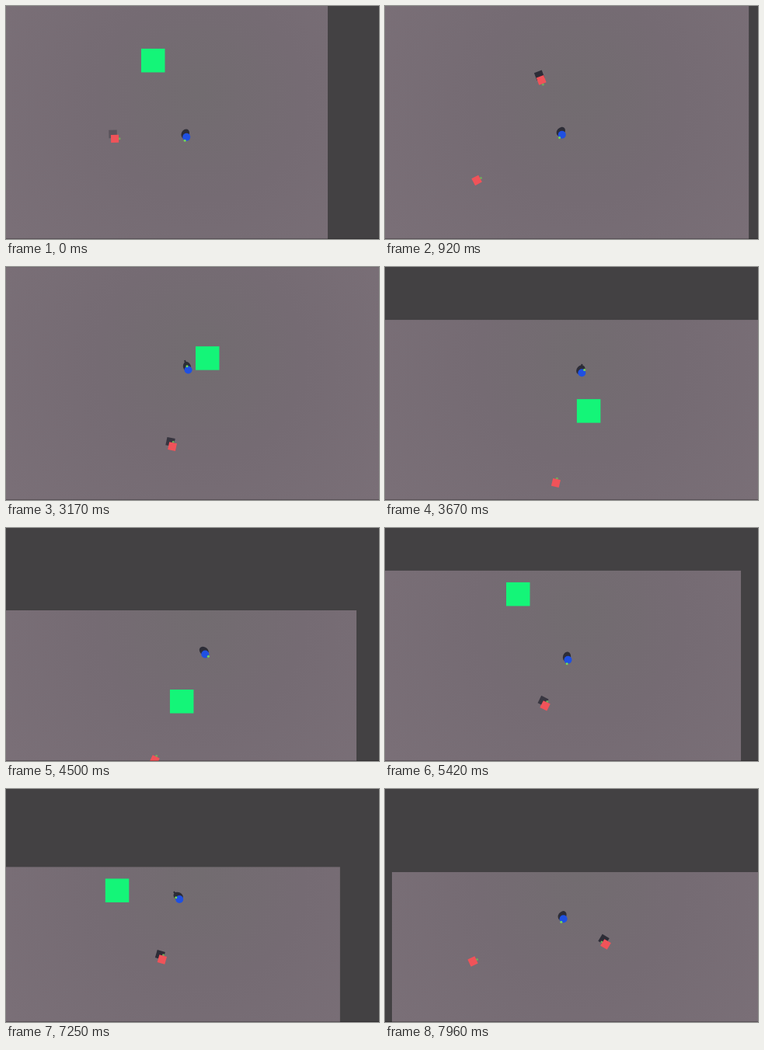
Animation of 480 by 300 pixels, one loop 8000 ms. Source, as an HTML page with a canvas:

```html
<!DOCTYPE html>
<html>
<head>
<meta charset="utf-8">
<style>
  html, body { margin: 0; height: 100%; overflow: hidden; background: #434143; }
  canvas { display: block; }
</style>
</head>
<body>
<canvas id="stage" width="480" height="300"></canvas>
<script>
const ctx = document.getElementById('stage').getContext('2d');
const W = 480, H = 300, LOOP = 8000, ARENA = 500, WALL_GAP = 43;
const DARK = '#2d2d37';

// Poses of the steered view: time, arena x and y, heading in degrees.
// The path leaves and enters each pose along its heading; equal places are a rest.
const poses = [
  [0, 326, 197, 115], [830, 277, 286, 120], [1830, 187, 290, 237],
  [2250, 171, 253, 305], [2900, 254, 181, 300], [3170, 256, 150, 252],
  [3670, 253, 82, 311], [4150, 289, 44, 350], [5030, 289, 44, 465],
  [5420, 282, 95, 465], [5750, 271, 131, 465], [6500, 271, 131, 677],
  [6630, 282, 124, 677], [7350, 302, 45, 550], [7960, 231, 43, 484]
];

// Way points: time, arena x and y
const chasers = [
  [[0, 226, 218], [1830, 240, 257.5], [3170, 230, 231], [3670, 233, 210],
   [5420, 248, 174], [6630, 267.5, 142], [7960, 275, 93]],
  [[0, 145, 380], [7960, 188, 267 ]].map(([t, x, y]) => [t, x, y]),
  [[7760, 98, 119], [7960, 104, 115]]
];

const goals = [
  { from: 0, to: 5300, x: 275.2, y: 117.3 },
  { from: 5300, to: 7760, x: 213.2, y: 30.3 }
];

const radians = degrees => degrees * Math.PI / 180;
const mix = (a, b, u) => a + (b - a) * u;

// The two rows around time t and the share of the way between them
function segment(track, t) {
  let i = 0;
  while (i < track.length - 2 && t >= track[i + 1][0]) i++;
  const a = track[i], b = track[i + 1];
  return [a, b, Math.min(1, (t - a[0]) / (b[0] - a[0]))];
}

function viewAt(t) {
  const [[, ax, ay, aDeg], [, bx, by, bDeg], u] = segment(poses, t);
  const from = radians(aDeg), to = radians(bDeg);
  const length = Math.hypot(bx - ax, by - ay);
  const curve = (a, b, outward, inward) =>
    mix(a, b, u * u * (3 - 2 * u))
    + length * u * (1 - u) * (outward * (1 - u) - inward * u);
  return {
    x: curve(ax, bx, Math.cos(from), Math.cos(to)),
    y: Math.max(WALL_GAP, curve(ay, by, Math.sin(from), Math.sin(to))),
    heading: mix(from, to, u)
  };
}

const floor = ctx.createRadialGradient(250, 110, 0, 250, 130, 330);
floor.addColorStop(0, '#726c70');
floor.addColorStop(0.4, '#756b73');
floor.addColorStop(1, '#7b7078');

function disc(x, y, r, color) {
  ctx.fillStyle = color;
  ctx.beginPath();
  ctx.arc(x, y, r, 0, 7);
  ctx.fill();
}

function square(x, y, size, angle, color) {
  ctx.save();
  ctx.translate(x, y);
  ctx.rotate(angle);
  ctx.fillStyle = color;
  ctx.fillRect(-size / 2, -size / 2, size, size);
  ctx.restore();
}

function drawChaser(x, y, angle) {
  // Shadows fade out away from the middle of the view
  const distance = Math.hypot(x - W / 2, y - H / 2);
  ctx.globalAlpha = Math.max(0, Math.min(1, (115 - distance) / 35));
  square(x - 2.5, y - 6, 10.5, angle, DARK);
  ctx.globalAlpha = 1;
  disc(x + 6 * Math.cos(angle), y + 6 * Math.sin(angle), 1.5, '#6fae5c');
  square(x, y, 10, angle, '#f05359');
}

function drawPlayer(x, y, angle) {
  const dx = Math.cos(angle), dy = Math.sin(angle);
  ctx.fillStyle = DARK;
  ctx.beginPath();
  ctx.ellipse(x - 1.5, y - 4, 6.5, 5, angle, 0, 7);
  ctx.fill();
  ctx.strokeStyle = DARK;
  ctx.lineWidth = 2;
  ctx.beginPath();
  ctx.moveTo(x - 1.5, y - 4);
  ctx.lineTo(x - 3 + 5 * dx, y - 7.5 + 5 * dy);
  ctx.stroke();
  disc(x, y, 5, '#1f50e2');
  disc(x + 5 * dx, y + 5 * dy, 1.5, '#72d95a');
}

function draw(t) {
  const view = viewAt(t);
  const left = W / 2 - view.x, top = H / 2 - view.y;

  // The body runs ahead of the middle of the view
  const px = W / 2 + 0.5 + 19.5 * Math.cos(view.heading);
  const py = H / 2 + 1 + 19.5 * Math.sin(view.heading);

  ctx.fillStyle = '#434143';
  ctx.fillRect(0, 0, W, H);
  ctx.fillStyle = floor;
  ctx.fillRect(left, top, ARENA, ARENA);

  for (const goal of goals) {
    if (t >= goal.from && t < goal.to) {
      square(left + goal.x, top + goal.y, 30.5, 0, '#14f578');
    }
  }
  for (const track of chasers) {
    if (t < track[0][0]) continue;
    const [a, b, u] = segment(track, t);
    const x = left + mix(a[1], b[1], u), y = top + mix(a[2], b[2], u);
    drawChaser(x, y, Math.atan2(py - y, px - x));
  }
  drawPlayer(px, py, view.heading);

  ctx.fillStyle = 'rgba(0,0,0,0.25)';
  ctx.fillRect(0, H - 1, W, 1);
}

const start = performance.now();
function tick() {
  draw((performance.now() - start) % LOOP);
  requestAnimationFrame(tick);
}
tick();
</script>
</body>
</html>
```
